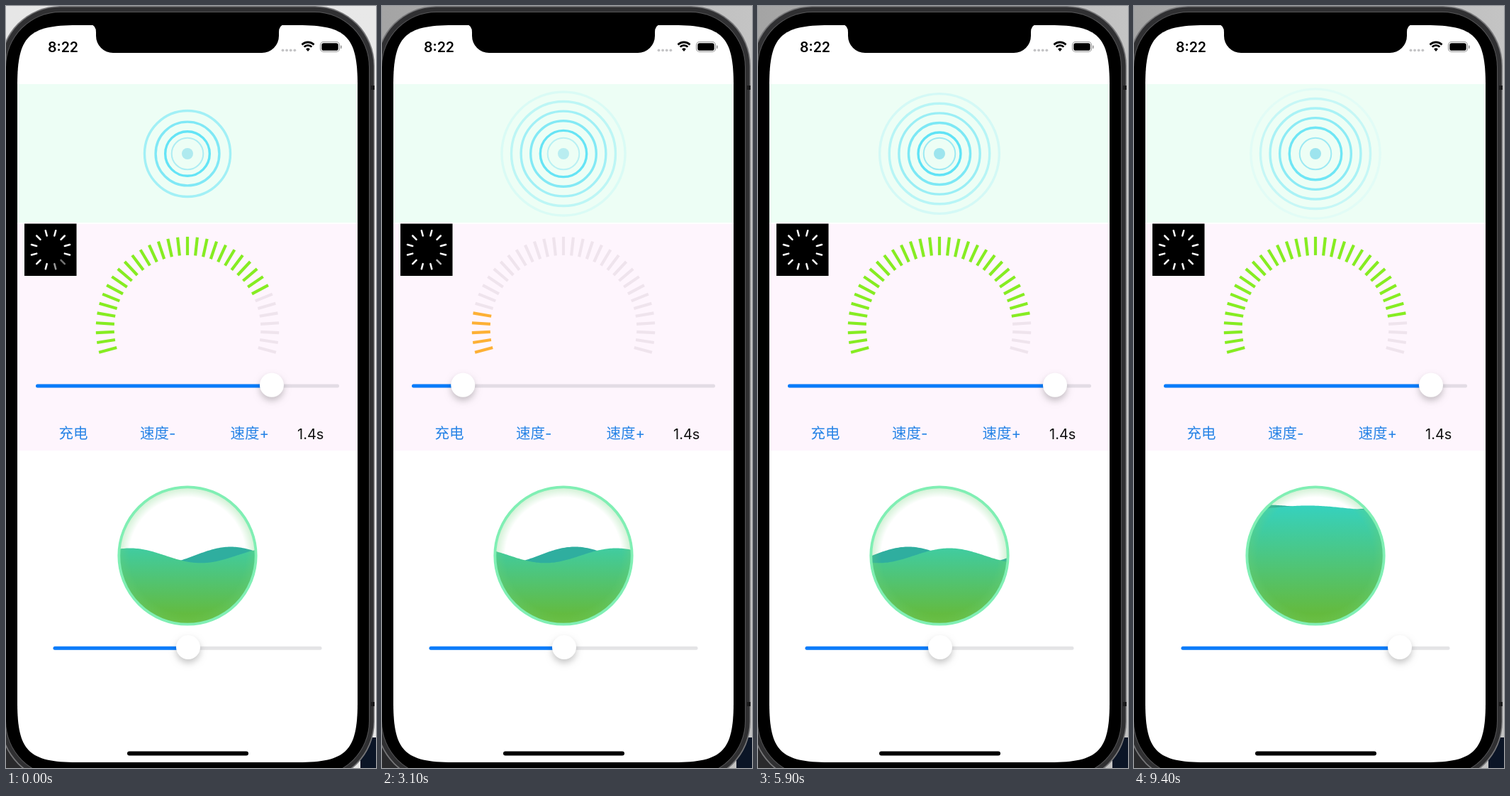
An HTML page with a canvas that plays this animation: 522 px wide and 1073 px high, repeating every 9500 ms.

```html
<!DOCTYPE html>
<html lang="zh">
<head>
<meta charset="utf-8">
<style>
html, body { margin: 0; width: 100%; height: 100%; overflow: hidden; background: #000; }
canvas { display: block; }
</style>
</head>
<body>
<canvas id="stage" width="522" height="1073"></canvas>
<script>
const c = document.getElementById('stage').getContext('2d');
const TAU = Math.PI * 2, LOOP = 9.5, BLUE = '#0a7cfb';

// [seconds, value] keys, joined linearly
const battery = [[0, 375], [1.2, 333], [2.05, 421], [3.1, 114], [4, 347], [4.3, 324], [4.9, 421], [5.5, 428], [5.9, 419]];
const water = [[0, 257], [6.4, 257], [7.4, 216], [8, 216], [9, 375]];
const spokeA = [[0, .45], [1.2, .5], [2, .4], [3.1, .72], [4.3, .5], [5.9, 1], [7.4, .5], [9.4, 1]];
const spokeB = [[0, .6], [1.2, .5], [2, .5], [3.1, 1], [4.3, .5], [5.9, 1], [7.4, .5], [9.4, 1]];

function at(keys, t) {
  const i = keys.findIndex(k => k[0] > t);
  if (i < 0) return keys[keys.length - 1][1];
  const [t0, a] = keys[i - 1], [t1, b] = keys[i];
  return a + (b - a) * (t - t0) / (t1 - t0);
}

function rect(x, y, w, h, fill, r = 0) {
  c.fillStyle = fill;
  c.beginPath();
  c.roundRect(x, y, w, h, r);
  c.fill();
}

// Rounded rectangle whose corners ease into the straight sides
function smoothRect(x, y, w, h, fill, e) {
  const k = e * .19, x1 = x + w, y1 = y + h;
  c.fillStyle = fill;
  c.beginPath();
  c.moveTo(x, y + e);
  c.bezierCurveTo(x, y + k, x + k, y, x + e, y);
  c.lineTo(x1 - e, y);
  c.bezierCurveTo(x1 - k, y, x1, y + k, x1, y + e);
  c.lineTo(x1, y1 - e);
  c.bezierCurveTo(x1, y1 - k, x1 - k, y1, x1 - e, y1);
  c.lineTo(x + e, y1);
  c.bezierCurveTo(x + k, y1, x, y1 - k, x, y1 - e);
  c.fill();
}

function disc(x, y, r, fill) {
  c.fillStyle = fill;
  c.beginPath();
  c.arc(x, y, r, 0, TAU);
  c.fill();
}

function ring(x, y, r, width, color, from = 0, to = TAU) {
  c.strokeStyle = color;
  c.lineWidth = width;
  c.beginPath();
  c.arc(x, y, r, from, to);
  c.stroke();
}

function line(x0, y0, x1, y1, width, color, cap = 'butt') {
  c.strokeStyle = color;
  c.lineWidth = width;
  c.lineCap = cap;
  c.beginPath();
  c.moveTo(x0, y0);
  c.lineTo(x1, y1);
  c.stroke();
  c.lineCap = 'butt';
}

function spoke(x, y, angle, r0, r1, width, color, cap) {
  const dx = Math.cos(angle), dy = Math.sin(angle);
  line(x + dx * r0, y + dy * r0, x + dx * r1, y + dy * r1, width, color, cap);
}

function text(s, x, y, size, color, weight = 400) {
  c.font = `${weight} ${size}px Inter, "Noto Sans CJK SC", "Noto Sans CJK", sans-serif`;
  c.fillStyle = color;
  c.fillText(s, x, y);
}

function phone(t) {
  const bright = t < 1.1;
  const bg = c.createLinearGradient(0, 0, 522, 0);
  bg.addColorStop(0, bright ? '#e6e6e6' : '#a4a4a4');
  bg.addColorStop(1, bright ? '#e8e8e8' : '#c4c4c4');
  rect(0, 0, 522, 1073, bg);
  rect(0, 1030, 40, 43, '#2a2a2c');
  rect(500, 1030, 22, 43, '#0b1526');
  rect(-8, 0, 528, 1092, '#777779', 84);
  rect(-6.5, 1.5, 525, 1089, '#303032', 83);
  rect(-1, 8, 514, 1077, '#555557', 78);
  rect(0, 9, 512, 1075, '#000', 77);
  for (const y of [112, 980]) rect(515, y, 5, 6, '#1a1a1b');

  smoothRect(16, 27, 480, 1038, '#fff', 84);
  rect(16, 110, 480, 195, '#edfef5');
  rect(16, 307, 480, 319, '#fef5fd');

  c.fillStyle = '#000';
  c.beginPath();
  c.moveTo(119, 26);
  c.lineTo(393, 26);
  c.quadraticCurveTo(385, 27, 385, 37);
  c.arcTo(385, 66, 360, 66, 24);
  c.arcTo(127, 66, 127, 40, 24);
  c.lineTo(127, 37);
  c.quadraticCurveTo(127, 27, 119, 26);
  c.fill();

  text('8:22', 59, 64.5, 19.5, '#000', 600);
  for (let i = 0; i < 4; i++) disc(390.5 + i * 5.6, 62.3, 1.9, '#c4c4c6');
  for (const r of [12, 7.6]) ring(426, 63, r, 2.8, '#000', -Math.PI * .75, -Math.PI * .25);
  c.fillStyle = '#000';
  c.beginPath();
  c.moveTo(426, 64);
  c.arc(426, 63.5, 4, -Math.PI * .75, -Math.PI * .25);
  c.fill();
  c.strokeStyle = '#999';
  c.lineWidth = 1.2;
  c.beginPath();
  c.roundRect(443.5, 50.5, 27, 14, 4.5);
  c.stroke();
  rect(445.3, 52.3, 23.4, 10.4, '#000', 2.8);
  rect(472, 55.5, 1.6, 4.5, '#999', 1);
  line(174, 1052.5, 339, 1052.5, 6, '#000', 'round');
}

function pulse(t) {
  for (let j = -2; j < 12; j++) {
    const r = 31.3 + 13.6 * (t - j) + (j < -1 ? 2 : 0);
    if (r > 24 && r < 94) ring(256, 208, r, 3.4, `rgba(80,224,246,${1 - (r - 22) / 74})`);
  }
  c.globalAlpha = .68 - .25 * Math.cos(TAU * (t - .15));
  ring(256, 208, 22.3, 2, '#78e0f2');
  disc(256, 208, 8, '#78d8ea');
  c.globalAlpha = 1;
}

function spinner(t) {
  rect(26, 306.5, 73.5, 73.5, '#000');
  for (let i = 0; i < 12; i++) {
    const alpha = i === 1 ? at(spokeA, t) : i === 2 ? at(spokeB, t) : 1;
    spoke(63, 343.3, (i * 30 + 15) * TAU / 360, 20.5, 28, 2.5, `rgba(255,255,255,${alpha})`, 'round');
  }
}

function gauge(v) {
  const lit = Math.ceil(v * 34 - .1), color = v < .2 ? '#fdb035' : '#86ec22';
  for (let i = 0; i < 35; i++) {
    const angle = (165 + i * 210 / 34) * TAU / 360;
    spoke(256, 454.2, angle, 103.3, 129.3, 4.2, i < lit ? color : '#efe4ed');
  }
}

function slider(x0, x1, y, knob) {
  line(x0 + 2.5, y, x1 - 2.5, y, 5, 'rgba(120,120,128,.2)', 'round');
  line(x0 + 2.5, y, knob, y, 5, BLUE, 'round');
  c.save();
  c.shadowColor = 'rgba(0,0,0,.22)';
  c.shadowBlur = 10;
  c.shadowOffsetY = 5;
  disc(knob, y - 1.3, 17, '#fff');
  c.restore();
}

function wave(level, amp, crest, fill) {
  c.fillStyle = fill;
  c.beginPath();
  c.moveTo(156, 875);
  for (let x = 156; x <= 356; x += 2) c.lineTo(x, level - amp * Math.cos(TAU * (x - crest) / 200));
  c.lineTo(356, 875);
  c.fill();
}

function tank(t, v) {
  const y = 676.5 + 196 * (1 - v), swing = 2 * Math.min(v, 1 - v), crest = 175 + 50 * t;
  c.save();
  c.beginPath();
  c.arc(256, 774, 95.5, 0, TAU);
  c.clip();
  wave(y - .5, 12 * swing, crest - 58, '#2fae9f');
  const fill = c.createLinearGradient(0, y - 49 * swing, 0, 872);
  fill.addColorStop(0, '#32d3c8');
  fill.addColorStop(1, '#69b830');
  wave(y, 10.5 * swing, crest, fill);
  const glow = c.createRadialGradient(256, 774, 82, 256, 774, 96);
  glow.addColorStop(0, 'rgba(110,210,120,0)');
  glow.addColorStop(1, 'rgba(110,210,120,.32)');
  disc(256, 774, 96, glow);
  c.restore();
  ring(256, 774, 96.7, 3.8, '#80efb4');
}

function draw(now) {
  const t = now / 1000 % LOOP;
  const charge = at(battery, t), level = at(water, t);
  phone(t);
  pulse(t);
  spinner(t);
  gauge((charge - 59) / 394);
  slider(42, 470, 535, charge);
  text('充电', 74.5, 609, 20.5, '#2583e6');
  text('速度-', 189, 609, 20.5, '#2583e6');
  text('速度+', 316.5, 609, 20.5, '#2583e6');
  text('1.4s', 411, 609.5, 20, '#111');
  tank(t, (level - 84) / 344);
  slider(66.5, 445.5, 904.3, level);
}

const start = performance.now();
function tick() {
  draw(performance.now() - start);
  requestAnimationFrame(tick);
}
tick();
</script>
</body>
</html>
```
